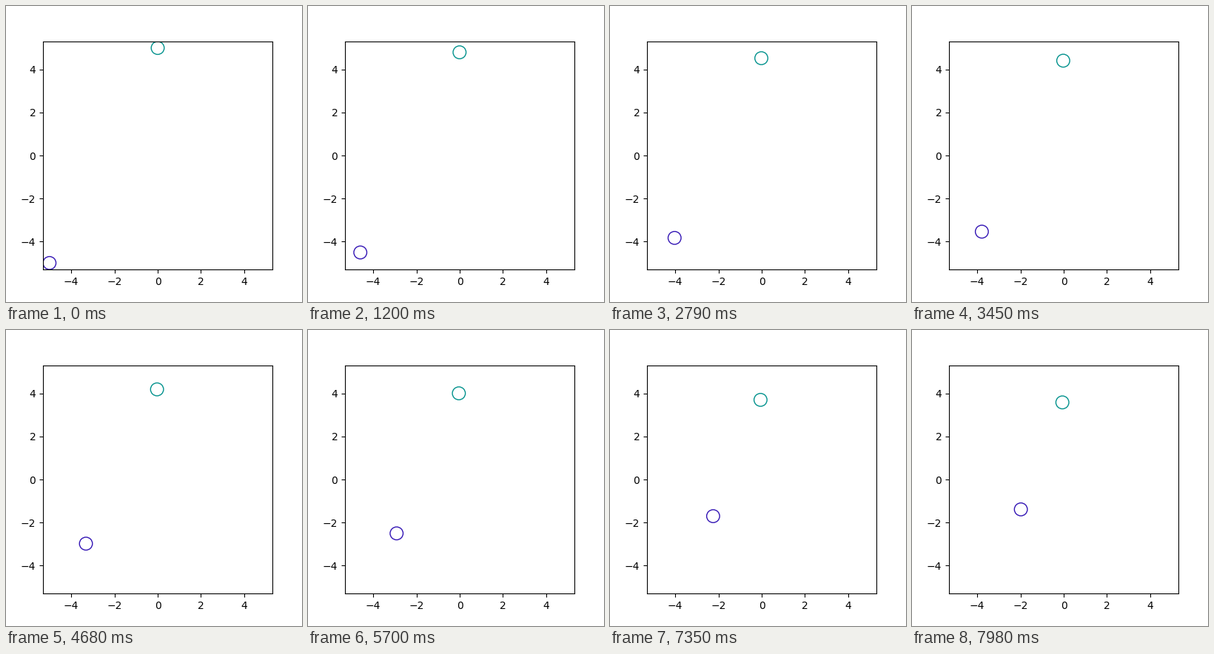
A matplotlib script that plays this animation: 400 px wide and 400 px high, repeating every 8 s.

```python
import math

import matplotlib.pyplot as plt
from matplotlib.animation import FuncAnimation
from matplotlib.patches import Circle

LOOP_MS = 8000
TICK_MS = 20
STEP_MS = 30
RADIUS = 0.3
LIMIT = 5 + RADIUS

# start, velocity and half acceleration, per step and axis
BALLS = [
    dict(start=(-5, -5), speed=(0.010, 0.012), pull=(5.1e-6, 5.9e-6),
         color="#3214b4"),
    dict(start=(0, 5), speed=(-1.5e-4, -0.005), pull=(-3e-7, -1.2e-6),
         color="#00918c"),
]

fig, ax = plt.subplots(figsize=(4, 4), dpi=100)
ax.set_xlim(-LIMIT, LIMIT)
ax.set_ylim(-LIMIT, LIMIT)

circles = [
    ax.add_patch(Circle(ball["start"], RADIUS, fill=False,
                        edgecolor=ball["color"], linewidth=1))
    for ball in BALLS
]


def position(ball, step):
    return [p + v * step + a * step ** 2
            for p, v, a in zip(ball["start"], ball["speed"], ball["pull"])]


def update(frame):
    step = math.ceil(frame * TICK_MS / STEP_MS)
    for circle, ball in zip(circles, BALLS):
        circle.center = position(ball, step)
    return circles


def init():
    return update(0)


anim = FuncAnimation(fig, update, frames=LOOP_MS // TICK_MS, init_func=init,
                     interval=TICK_MS, repeat=True, repeat_delay=0)
plt.show()
```
